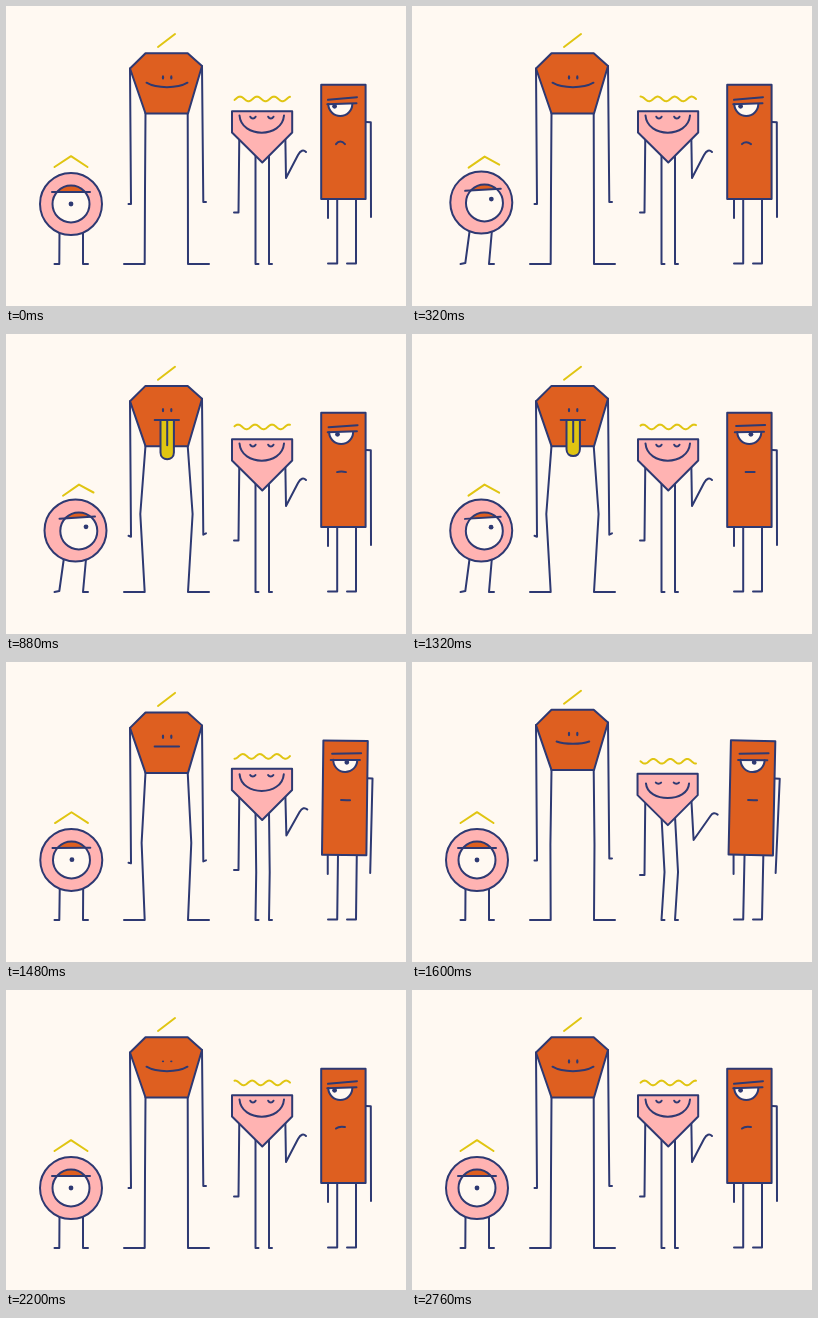
Recreate the animation shown at these times as an HTML page with a canvas. Size 400x300 px, loop 2.8 s.

```html
<!DOCTYPE html>
<html lang="en">
<head>
<meta charset="utf-8">
<title>Four shapes</title>
<style>
html, body { margin: 0; width: 100%; height: 100%; overflow: hidden; background: #fff9f2; }
canvas { display: block; width: 400px; height: 300px; }
</style>
</head>
<body>
<canvas id="stage" width="400" height="300"></canvas>
<script>
const ctx = document.getElementById('stage').getContext('2d');
const LOOP = 2800, STEP = 40;
const PAPER = '#fff9f2', INK = '#2e3972', ORANGE = '#de5f20', PINK = '#ffb3b2', YELLOW = '#e0c512';

const mix = (a, b, k) => a + (b - a) * k;
const clamp = v => Math.max(0, Math.min(1, v));
const ramp = (t, from, to) => clamp((t - from) / (to - from));
const quad = k => k < .5 ? 2 * k * k : 1 - 2 * (1 - k) ** 2;
const cubic = k => k < .5 ? 4 * k ** 3 : 1 - 4 * (1 - k) ** 3;
// Rises over a..b, holds, falls over c..d.
const hold = (t, a, b, c, d, ease = quad) => ease(ramp(t, a, b)) - ease(ramp(t, c, d));
const bump = (t, from, to) => Math.sin(Math.PI * ramp(t, from, to)) ** 2;

function paint(fill, stroke = INK) {
  if (fill) { ctx.fillStyle = fill; ctx.fill(); }
  if (stroke) { ctx.strokeStyle = stroke; ctx.stroke(); }
}

function line(points, color = INK, fill = null, closed = false) {
  ctx.beginPath();
  points.forEach(([x, y]) => ctx.lineTo(x, y));
  if (closed) ctx.closePath();
  paint(fill, color);
}

const shape = (points, fill) => line(points, INK, fill, true);

function disc(x, y, r, fill, stroke) {
  ctx.beginPath();
  ctx.arc(x, y, r, 0, 2 * Math.PI);
  paint(fill, stroke);
}

function curve(x1, y1, cx1, cy1, cx2, cy2, x2, y2) {
  ctx.beginPath();
  ctx.moveTo(x1, y1);
  ctx.bezierCurveTo(cx1, cy1, cx2, cy2, x2, y2);
  paint(null);
}

function drawRound(t) {
  const k = hold(t, 40, 400, 1240, 1560, cubic);
  const blink = bump(t, 2280, 2560) * 23;
  const x = mix(65, 69.5, k), y = mix(198, 196.5, k);
  const ex = mix(65, 72.8, k), ey = mix(198, 196.9, k);
  const lid = [[mix(46, 53.5, k), mix(186, 184.8, k) + blink],
               [mix(84, 89, k), mix(186, 182.6, k) + blink]];

  line([[mix(53.5, 57.8, k), 225], [53.3, mix(258, 257, k)], [48.5, 258]]);
  line([[mix(77, 80, k), 225], [77, 258], [82, 258]]);
  disc(x, y, 31, PINK, INK);
  disc(ex, ey, 18.5, PAPER, null);
  disc(mix(65, 80, k), mix(198, 192.8, k), 2.4, INK, null);

  ctx.save();
  ctx.beginPath();
  ctx.arc(ex, ey, 18.5, 0, 2 * Math.PI);
  ctx.clip();
  line([...lid, [ex + 25, ey - 25], [ex - 25, ey - 25]], null, ORANGE);
  ctx.restore();

  disc(ex, ey, 18.5, null, INK);
  line(lid);
  line([[mix(48.5, 57, k), mix(161, 161.7, k)],
        [mix(65, 73, k), mix(150.2, 150.6, k)],
        [mix(81.5, 87.5, k), mix(161, 158.5, k)]], YELLOW);
}

function drawTongue(y, length) {
  if (length < 1) return;
  const r = Math.min(6.7, length / 2), left = 154.5, right = 167.9;
  ctx.beginPath();
  ctx.moveTo(left, y);
  ctx.lineTo(left, y + length - r);
  ctx.bezierCurveTo(left, y + length + r / 3, right, y + length + r / 3, right, y + length - r);
  ctx.lineTo(right, y);
  paint(YELLOW);
  line([[161.2, y], [161.2, y + Math.max(0, length - 14)]]);
}

function drawTall(t) {
  const k = hold(t, 340, 560, 1360, 1680);
  const flat = hold(t, 340, 560, 1440, 1760, cubic);
  const hairDip = 4.8 * hold(t, 400, 740, 1290, 1720);
  const dip = 4.7 * k, bend = 4.7 * k;

  line([[139.5, 107 + dip], [139 - bend, mix(183, 180, k)], [138.7, 258], [118, 258]]);
  line([[181.7, 107 + dip], [181.9 + bend, mix(183, 180, k)], [182, 258], [203, 258]]);
  line([[124, 62.5 + dip], [125, 198 + dip], [122.5, 198 + dip * .8]]);
  line([[196, 60 + dip], [197.3, 196 + dip], [200, 196 + dip * .7]]);
  shape([[139.5, 47.2 + dip], [181.7, 47.2 + dip], [196, 60 + dip],
         [182, 107.5 + dip], [139.5, 107.5 + dip], [124, 62.5 + dip]], ORANGE);

  const open = 1 - .85 * bump(t, 2140, 2320);
  for (const x of [157, 165.3]) {
    ctx.beginPath();
    ctx.ellipse(x, 71.4 + dip, 1.15, 2.2 * open, 0, 0, 2 * Math.PI);
    paint(INK, null);
  }

  const mouthY = mix(76.7, 81.2, flat) + dip, sag = 6 * (1 - flat);
  const left = mix(140.5, 148.7, flat), right = mix(181.5, 173, flat);
  const out = hold(t, 580, 700, 1280, 1480) + .35 * bump(t, 620, 840);
  drawTongue(mouthY, 39.3 * out);
  curve(left, mouthY, mix(left, right, .25), mouthY + sag,
        mix(left, right, .75), mouthY + sag, right, mouthY);

  line([[152, 41 + hairDip], [169, 28 + hairDip]], YELLOW);
}

function drawWave(t, y) {
  const length = 17, crest = 234 + length * 6 * t / LOOP;
  const points = [];
  for (let x = 228.5; x <= 284; x += .5) {
    points.push([x, y - 2.3 * Math.cos(2 * Math.PI * (x - crest) / length)]);
  }
  line(points, YELLOW);
}

function drawTriangle(t) {
  const k = hold(t, 1400, 1640, 1720, 2080);
  const dip = 7 * k, face = 3.5 * k;

  line([[249.5, 148 + dip], [249.5 + 3.2 * k, 210], [249.5, 258], [252.5, 258]]);
  line([[263, 148 + dip], [263 + 3.2 * k, 210], [263, 258], [266, 258]]);
  line([[233.3, 130 + dip], [232.5, 206.5 + dip], [228, 206.5 + dip]]);

  ctx.beginPath();
  ctx.moveTo(279.3, 130 + dip);
  ctx.lineTo(280 + 1.7 * k, 172 + 6.3 * k);
  ctx.lineTo(292 + 7 * k, 149 + 5 * k);
  ctx.quadraticCurveTo(296 + 6 * k, 142 + 8 * k, 300 + 6 * k, 146 + 7 * k);
  paint(null);

  const x = -.5 * k;
  shape([[226 + x, 105.2 + dip], [286.2 + x, 105.2 + dip], [286.2 + x, 126.5 + dip],
         [256.3 + x, 156.5 + dip], [226 + x, 126.5 + dip]], PINK);
  for (const eye of [244.3, 262.2]) {
    const y = 110.7 + dip + face;
    curve(eye + x, y, eye + 1.2 + x, y + 2.3 - k, eye + 4 + x, y + 2.3 - k, eye + 5.3 + x, y);
  }
  const y = 109.5 + dip, lift = 5.6 * k;
  curve(233.5 + .5 * k, y + lift, 235.5, y + 23 + 2 * k, 276, y + 23 + 2 * k, 278 - k, y + lift);
  drawWave(t, 92.9 + dip * .96);
}

function drawBlock(t) {
  const lean = bump(t, 1400, 1720);
  const look = hold(t, 640, 1280, 1720, 2160);
  const angle = .0245 * lean, pivotX = 337, pivotY = 257;
  const turn = (x, y) => [pivotX + (x - pivotX) * Math.cos(angle) - (y - pivotY) * Math.sin(angle),
                          pivotY + (x - pivotX) * Math.sin(angle) + (y - pivotY) * Math.cos(angle)];

  line([turn(331.2, 192), [331.2, 257.5], [322, 257.5]]);
  line([turn(350, 192), [350, 257.5], [341, 257.5]]);
  line([[322 - .5 * lean, 192], [322 - .5 * lean, 212]]);
  line([turn(360, 116), turn(364.8, 116.2), [365 - 1.6 * lean, 211]]);

  ctx.save();
  ctx.translate(pivotX, pivotY);
  ctx.rotate(angle);
  ctx.translate(-pivotX, -pivotY);
  shape([[315.2, 78.7], [359.6, 78.7], [359.6, 193], [315.2, 193]], ORANGE);

  const x = 3 * look;
  ctx.beginPath();
  ctx.arc(334.3 + x, 98, 12, 0, Math.PI);
  paint(PAPER);
  disc(328.6 + x + 7.3 * look, 100.3, 2.4, INK, null);
  line([[321.3 + x * .5, 98.2], [350.5 + x * .5, mix(97.2, 97.8, look)]]);
  line([[322 + x * .7, mix(93.8, 91.9, look)], [351 + x * .7, mix(91.2, 91, look)]]);

  const back = quad(ramp(t, 1720, 2160));
  const frown = 3.4 - 2.2 * ramp(t, 0, 560) - 1.2 * ramp(t, 640, 1200) + 1.6 * back;
  const mx = 330 + x * 1.2, tilt = .5 * back;
  curve(mx, 138.1 + tilt, mx + 2.5, 138.1 - frown, mx + 6, 138.1 - frown, mx + 9, 138.1 - tilt * 2);
  ctx.restore();
}

function render(now) {
  const t = Math.floor(now % LOOP / STEP) * STEP;
  ctx.fillStyle = PAPER;
  ctx.fillRect(0, 0, 400, 300);
  ctx.lineWidth = 2;
  ctx.lineCap = ctx.lineJoin = 'round';
  drawRound(t);
  drawTall(t);
  drawTriangle(t);
  drawBlock(t);
  requestAnimationFrame(render);
}

requestAnimationFrame(render);
</script>
</body>
</html>
```
